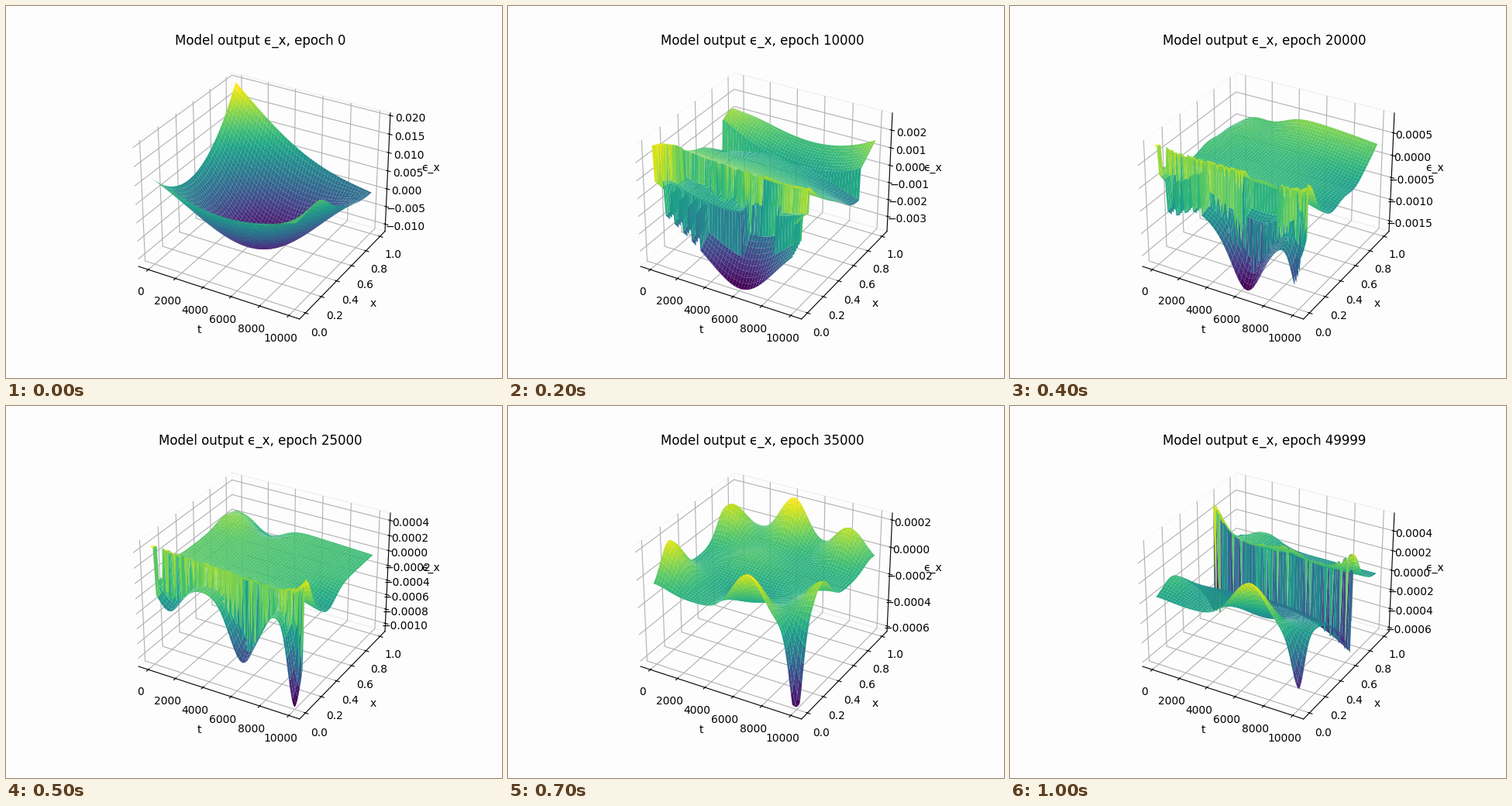
Animation of 640x480 px, one loop 1.1 s. Source, as a matplotlib script:

```python
import numpy as np
import matplotlib.pyplot as plt
from matplotlib.animation import FuncAnimation

N = 99
FRAMES = 11
BACK = "#fdfdfd"
plt.rcParams.update({"font.family": "DejaVu Sans",
                     "figure.facecolor": BACK, "axes.facecolor": BACK})

T, X = np.meshgrid(np.linspace(0, 1, N), np.linspace(0, 1, N))
COL = np.arange(N)
ARCH = np.sin(np.pi * T)
ENDS = (2 * T - 1) ** 2


def bump(t, x, wt=.14, wx=.14):
    return np.exp(-((T - t) / wt) ** 2 - ((X - x) / wx) ** 2)


def jag(seed, amp, shape=N):
    return np.random.default_rng(seed).uniform(-amp, amp, shape)


# Each surface is a height between 0 and 1 over the unit square (T, X).

def bowl():
    left = .73 - 1.27 * X + 1.54 * X**2
    right = .53 + .18 * np.cos(np.pi * X) + .08 * bump(1, .3)
    return left + (right - left) * T - ARCH * (.14 + .36 * np.sin(np.pi * X))


def three_sheets():
    low = .47 - .44 * ARCH + X * (1.1 * ARCH + .7 * T)
    mid = .96 - .7 * X + ENDS * (.15 - .4 * X) + .15 * (1 - T) ** 2
    back = .37 + 1.7 * (T - .55) ** 2
    back += .1 * (1 - T) * np.sin(5 * np.pi * (X - .8))
    edge = .32 - .18 * T + jag(1, .07) * (np.abs(T - .42) < .2)
    front = (X < edge) & (T > .03 + jag(2, .06, (N, 1)))
    return np.where(front, low, np.where(X > .8, back, mid))


def pocket():
    low = .53 - (.52 - 2 * X) * np.exp(-((T - .64) / .27) ** 2)
    top = .58 + .33 * np.exp(-(X / .22) ** 2) + .05 * ARCH
    top += .27 * X**6 * np.tanh(5 * T) + .1 * bump(.65, .15, .1, .06)
    top += .08 * bump(0, .6) - .1 * bump(1, .7, .3)
    edge = .11 + .09 * (np.abs(T - .67) < .11)
    fins = (T < .34) & (COL % 6 < 2)
    return np.where((X < edge) & (T > .08) & (T < .97) & ~fins, low, top)


def ragged():
    wells = .25 * np.exp(-((T - .12) / .12) ** 2)
    wells += .5 * np.exp(-((T - .64) / .13) ** 2)
    low = .74 - wells * (1 - 2 * X) - .74 * bump(1, 0, .07)
    top = .68 + .25 * np.exp(-(X / .18) ** 2) + .06 * (1 - T)
    top += .08 * bump(.1, .85) - .12 * bump(.25, 1) - .12 * bump(1, .4)
    top += .15 * bump(1, .13, .08, .08)
    front = (X < .1 + jag(5, .04)) & ((T > .03) | (X > .05))
    return np.where(front, low, top)


def waves():
    z = .62 + .36 * bump(.66, 0, .15) - .75 * bump(1, 0, .07, .09)
    z += .32 * bump(0, .18) + .28 * bump(.05, .84) + .37 * bump(.42, 1)
    z += .26 * bump(.83, .95) + .24 * bump(1, .3)
    return z + .08 * bump(.35, .6, .2, .2) - .08 * bump(.5, .3, .2)


def cliff():
    front = .55 + .36 * bump(.66, 0, .17) - .4 * bump(1, 0, .07, .09)
    front += .1 * bump(0, .18) - .1 * bump(.6, .3, .2)
    front -= (X / .66) ** 3 * (.3 + .22 * ENDS)
    rise = ((1 - X) / .33) ** 2
    back = .52 + rise * (.24 + .03 * np.cos(4 * np.pi * T))
    back += .2 * bump(0, .67, .08) + .1 * bump(1, .7, .07, .08)
    back += .12 * bump(.2, .93)
    return np.where(X < .67 + jag(8, .01), front, back)


# step: (lowest value, highest value, surface)
KEYS = {
    0: (-.0114, .0200, bowl()),
    1: (-.00531, .00475, three_sheets()),
    3: (-.00265, .00167, pocket()),
    5: (-.00108, .000464, ragged()),
    7: (-.000623, .000233, waves()),
    8: (-.000618, .000553, cliff()),
}


def state(step):
    """Value range and heights; steps between keys blend their neighbours."""
    step = min(step, 8)
    if step in KEYS:
        lo, hi, z = KEYS[step]
        return lo, hi, np.clip(z, 0, 1)
    (lo0, hi0, z0), (lo1, hi1, z1) = KEYS[step - 1], KEYS[step + 1]
    z = np.clip(z0, 0, 1) + np.clip(z1, 0, 1)
    return -np.sqrt(lo0 * lo1), np.sqrt(hi0 * hi1), (z - z.min()) / np.ptp(z)


fig = plt.figure(figsize=(6.4, 4.8), dpi=100)
ax = fig.add_subplot(projection="3d")


def draw(step):
    lo, hi, z = state(step)
    ax.clear()
    ax.plot_surface(T * 10000, X, lo + (hi - lo) * z, cmap="viridis")
    ax.auto_scale_xyz([0, 10000], [0, 1], [lo, hi])
    for axis in (ax.xaxis, ax.yaxis, ax.zaxis):
        axis.pane.set_facecolor(BACK)
    ax.set_xlabel("t")
    ax.set_ylabel("x")
    ax.set_zlabel("\u03f5_x")
    ax.set_title(f"Model output \u03f5_x, epoch {min(step * 5000, 49999)}")
    return []


anim = FuncAnimation(fig, draw, frames=FRAMES, interval=100,
                     init_func=lambda: [], repeat=True)
plt.show()
```
